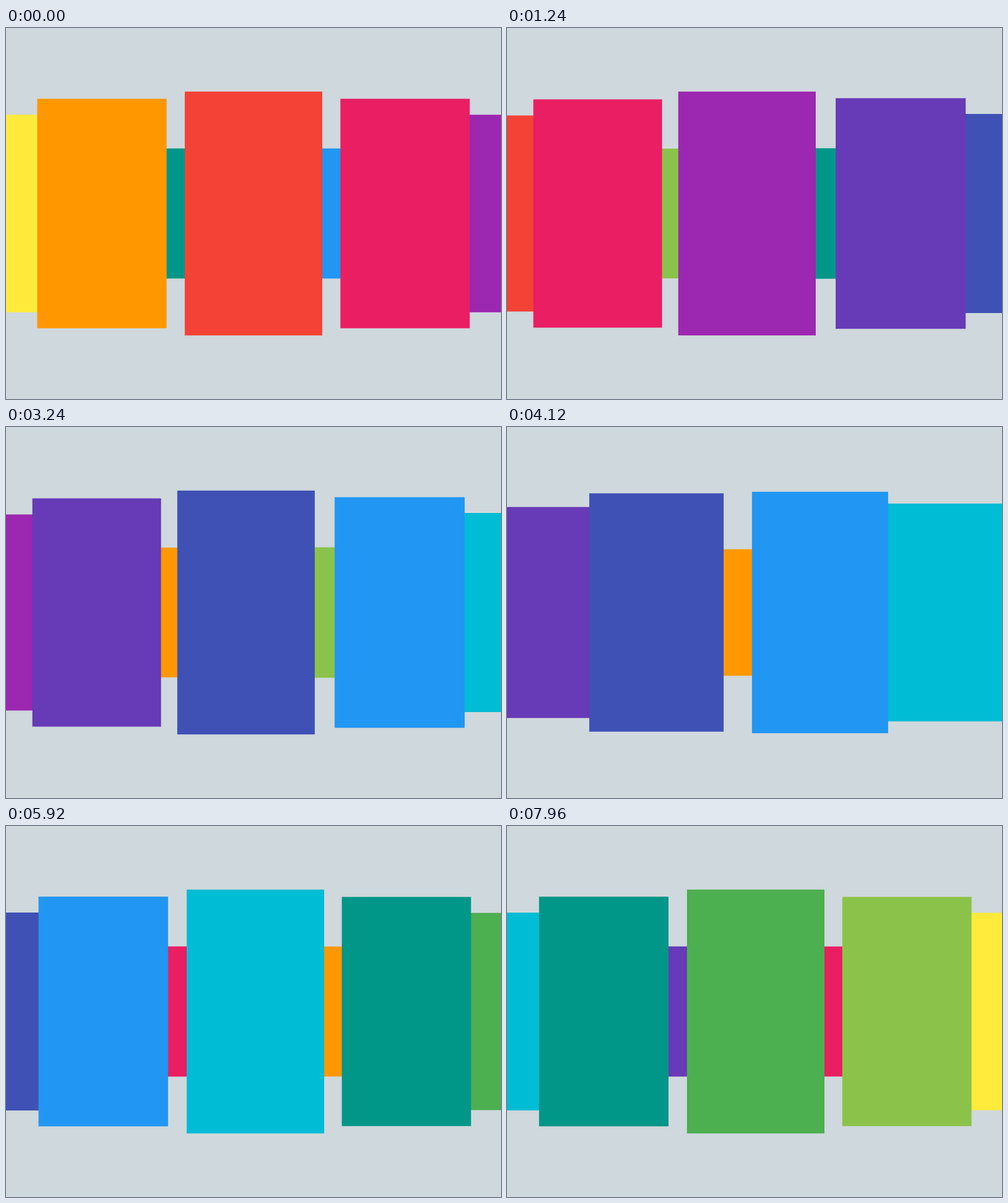
Animation, 800 px wide and 600 px high, one loop 8000 ms. Source, as an HTML page with a canvas:

```html
<!DOCTYPE html>
<html lang="en">
<head>
<meta charset="utf-8">
<title>Card carousel</title>
<style>
  html, body { margin: 0; width: 100%; height: 100%; overflow: hidden; background: #cfd8dc; }
  canvas { display: block; width: 800px; height: 600px; }
</style>
</head>
<body>
<canvas id="stage" width="800" height="600"></canvas>
<script>
const ctx = document.getElementById('stage').getContext('2d');
const COLORS = [
  '#f44336', '#e91e63', '#9c27b0', '#673ab7', '#3f51b5', '#2196f3',
  '#00bcd4', '#009688', '#4caf50', '#8bc34a', '#ffeb3b', '#ff9800'
];
const LOOP = 8000, STEP = 1000, DELAY = 3;
const CARD_W = 222.2, CARD_H = 394.4;
const RADIUS = 520.7, PERSPECTIVE = 1111;
const SLICE = 2 * Math.PI / COLORS.length;

function cubicBezier(x1, y1, x2, y2) {
  const curve = (a, b, s) =>
    3 * a * s * (1 - s) ** 2 + 3 * b * s * s * (1 - s) + s ** 3;
  return x => {
    let low = 0, high = 1;
    for (let i = 0; i < 30; i++) {
      const mid = (low + high) / 2;
      if (curve(x1, x2, mid) < x) low = mid; else high = mid;
    }
    return curve(y1, y2, (low + high) / 2);
  };
}

const bounce = cubicBezier(0.356, 1.95, 0.297, 0.86);

// Rotation in card slices: one bouncing turn per step
function rotationAt(time) {
  const local = Math.max(0, time % STEP - DELAY) / STEP;
  return Math.floor(time / STEP) + (local ? bounce(local) : 0);
}

function draw(time) {
  const rotation = rotationAt(time);
  const cards = COLORS.map((color, i) => {
    const angle = (i - rotation) * SLICE;
    const depth = RADIUS * (1 - Math.cos(angle));
    const scale = PERSPECTIVE / (PERSPECTIVE + depth);
    return { color, depth, scale, x: 400 + RADIUS * Math.sin(angle) * scale };
  });
  cards.sort((a, b) => b.depth - a.depth);

  ctx.fillStyle = '#cfd8dc';
  ctx.fillRect(0, 0, 800, 600);
  for (const { color, scale, x } of cards) {
    const w = CARD_W * scale, h = CARD_H * scale;
    ctx.fillStyle = color;
    ctx.fillRect(x - w / 2, 300 - h / 2, w, h);
  }
}

const start = performance.now();
function frame() {
  draw((performance.now() - start) % LOOP);
  requestAnimationFrame(frame);
}
draw(0);
requestAnimationFrame(frame);
</script>
</body>
</html>
```
